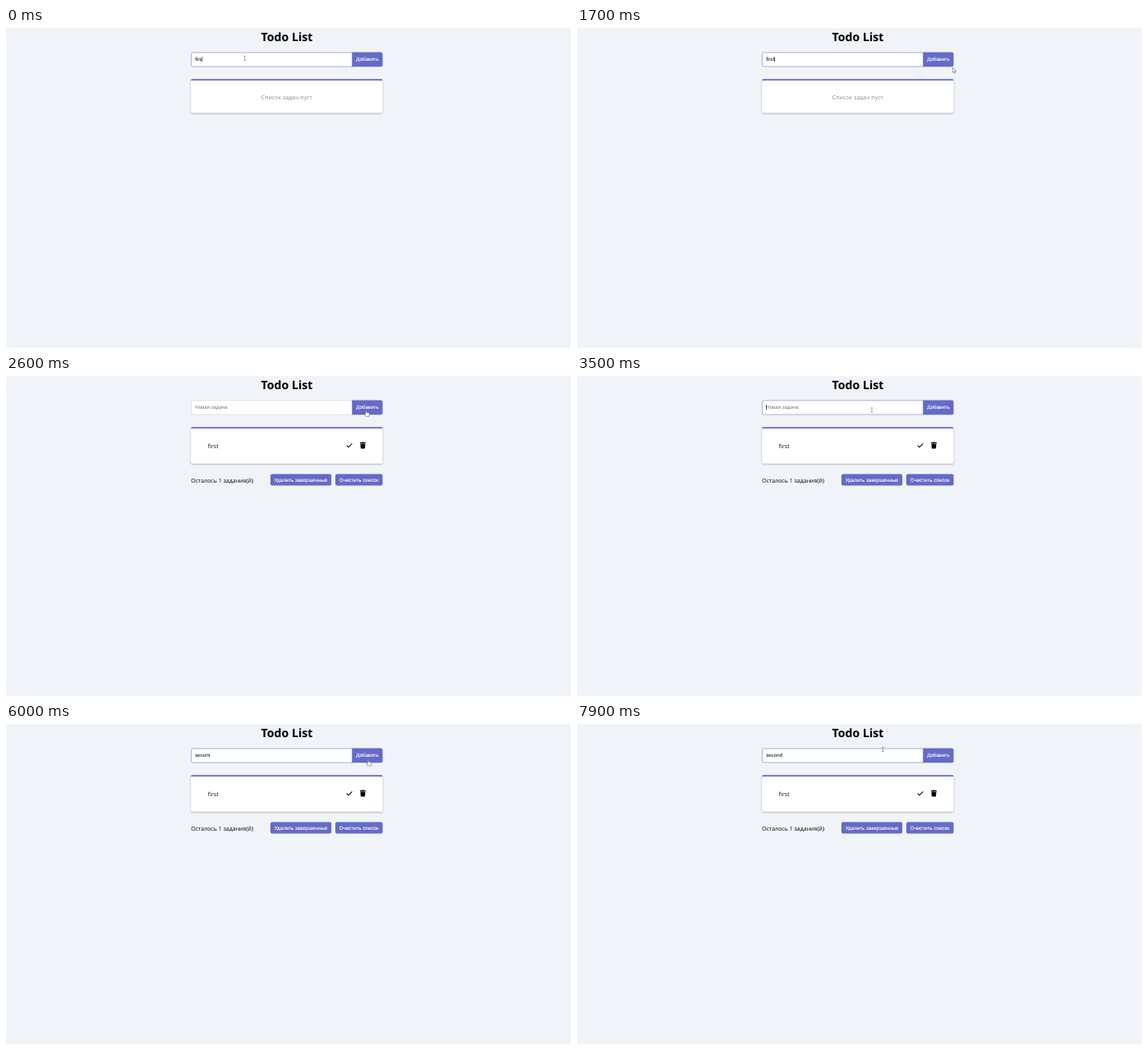
Animation of 688x390 px, one loop 8000 ms. Source, as an HTML page:

```html
<!DOCTYPE html>
<html lang="ru">
<head>
<meta charset="utf-8">
<title>Todo List</title>
<style>
  html, body { margin: 0; width: 100%; height: 100%; overflow: hidden; background: #f0f4f8; }
  svg { display: block; width: 100vw; height: 100vh; }
  text { font: 7px "Open Sans", "Noto Sans", sans-serif; text-rendering: geometricPrecision; white-space: pre; }
  .title { font-size: 14.2px; font-weight: 700; }
  .form { font: 6.2px "Liberation Sans", Arial, sans-serif; }
  .middle { text-anchor: middle; }
  .accent { fill: #646ac6; }
  .label { fill: #fff; stroke: #fff; stroke-width: .12; }
  .card { filter: drop-shadow(0 1px 1.2px rgba(0, 0, 0, .25)); }
  .pointer path { fill: #fff; stroke: #444; stroke-width: .5; stroke-linejoin: round; }
  .pointer .ibeam { fill: none; stroke: #555; }
</style>
</head>
<body>
<svg viewBox="0 0 688 390">
  <text class="title middle" x="342" y="15.6">Todo List</text>

  <rect id="field" x="225.5" y="29.9" width="198" height="17.1" rx="2" fill="#fff" stroke-width=".7"/>
  <path class="accent" d="M421.3 29.6H456.5Q458.6 29.6 458.6 31.7V45.2Q458.6 47.3 456.5 47.3H421.3Z"/>
  <text class="form label middle" x="440" y="40.3">Добавить</text>
  <text class="form" id="value" x="230.2" y="40.3"></text>
  <rect id="caret" y="35" width=".6" height="6.4"/>

  <g class="card">
    <rect id="panel" x="225.2" y="62.2" width="233.4" rx="2" fill="#fff"/>
    <path class="accent" d="M225.2 64Q225.2 62.2 227 62.2H456.8Q458.6 62.2 458.6 64Z"/>
  </g>

  <text id="empty" class="middle" x="341.8" y="87.2" fill="#888">Список задач пуст</text>
  <text id="loading" x="236.4" y="79.6">Получение задач</text>

  <g id="list">
    <text x="245.8" y="88.4">first</text>
    <path d="M414.8 84.6L417 86.8L421.4 82.3" fill="none" stroke="#000" stroke-width="1.1"/>
    <path d="M431 81.1H433L433.5 80.5H435.5L436 81.1H438V82.1H431ZM431.5 82.6H437.5L437.1 87.8Q437 88.6 436.3 88.6H432.7Q432 88.6 431.9 87.8Z"/>
    <text x="225.2" y="129.8">Осталось 1 задания(й)</text>
    <rect class="accent" x="322" y="119.6" width="74.2" height="13.9" rx="2"/>
    <rect class="accent" x="401" y="119.6" width="57.6" height="13.9" rx="2"/>
    <text class="form label middle" x="359.1" y="128.6">Удалить завершенные</text>
    <text class="form label middle" x="429.8" y="128.6">Очистить список</text>
  </g>

  <g id="pointer" class="pointer">
    <path class="ibeam" d="M-1.2 -2.6H1.2M0 -2.6V2.6M-1.2 2.6H1.2"/>
    <path class="arrow" d="M0 0V6L1.4 4.8L2.4 7L3.3 6.6L2.4 4.4H4.1Z"/>
    <path class="hand" d="M-.6 .6Q0 -.3 .6 .6V3L3.6 3.7Q4.2 4 4 5L3.4 8H-.3L-2.3 5.2Q-2.2 4.1 -.6 5Z"/>
  </g>
</svg>
<script>
const LOOP = 8000, STEP = 100;
const SUBMIT = 2400, LOADED = 2500, FOCUS = 3400;
const KEY_START = 4000, KEY_GAP = 220, BLINK = 540;
const byId = id => document.getElementById(id);

// The second word is typed at an even pace, with a typo that is then fixed.
const edits = [
  { at: 0, text: "firs" },
  { at: 200, text: "first" },
  { at: SUBMIT, text: "" },
  { at: FOCUS, text: "" },
  ...Array.from("secont", (_, i) => ({ at: KEY_START + i * KEY_GAP, text: "secont".slice(0, i + 1) })),
  { at: 6900, text: "secon" },
  { at: 7200, text: "second" },
];

const panelHeights = { empty: 41.4, loading: 26.6, list: 44.6 };

const pointerStart = { x: 290.7, y: 37 };
const moves = [
  { from: 100, to: 1400, x: 470, y: 48.3 },     // past the button
  { from: 1400, to: 1700, x: 457.7, y: 48.3 },
  { from: 1900, to: 2100, x: 438.6, y: 41.3 },  // onto the button
  { from: 3100, to: 3500, x: 359, y: 41.5 },    // into the field
  { from: 5400, to: 5800, x: 441, y: 43 },      // to the button again
  { from: 6100, to: 6700, x: 392, y: 35 },      // back to fix the typo
  { from: 6700, to: 6900, x: 361, y: 31 },
  { from: 7500, to: 7900, x: 372.5, y: 31 },
];

function ease(from, to, t) {
  const k = Math.min(1, Math.max(0, (t - from) / (to - from)));
  return k * k * (3 - 2 * k);
}

function pointerAt(t) {
  return moves.reduce((p, { from, to, x, y }) => {
    const k = ease(from, to, t);
    return { x: p.x + (x - p.x) * k, y: p.y + (y - p.y) * k };
  }, pointerStart);
}

function pointerKind({ x, y }) {
  if (y < 29 || y > 47.5 || x < 225 || x > 458.6) return "arrow";
  return x < 421 ? "ibeam" : "hand";
}

function show(element, visible) {
  element.style.display = visible ? "" : "none";
}

function drawField(t) {
  const { at, text } = edits.findLast(edit => edit.at <= t);
  const focused = t < SUBMIT || t >= FOCUS;
  const value = byId("value"), caret = byId("caret");
  value.textContent = text || "Новая задача";
  value.setAttribute("fill", text ? "#000" : "#757575");
  caret.setAttribute("x", 230.3 + (text ? value.getComputedTextLength() : 0));
  show(caret, focused && (t - at) % (2 * BLINK) < BLINK);
  byId("field").setAttribute("stroke", focused ? "#8a90d2" : "#d5d8de");
}

function drawPanel(t) {
  const view = t < SUBMIT ? "empty" : t < LOADED ? "loading" : "list";
  for (const id in panelHeights) show(byId(id), id === view);
  byId("panel").setAttribute("height", panelHeights[view]);
}

function drawPointer(t) {
  const position = pointerAt(t), kind = pointerKind(position);
  byId("pointer").setAttribute("transform", `translate(${position.x} ${position.y})`);
  for (const shape of byId("pointer").children) show(shape, shape.classList.contains(kind));
}

const started = performance.now();
function tick() {
  const elapsed = (performance.now() - started) % LOOP;
  const t = Math.floor(elapsed / STEP) * STEP;
  drawField(t);
  drawPanel(t);
  drawPointer(t);
  requestAnimationFrame(tick);
}
tick();
</script>
</body>
</html>
```
